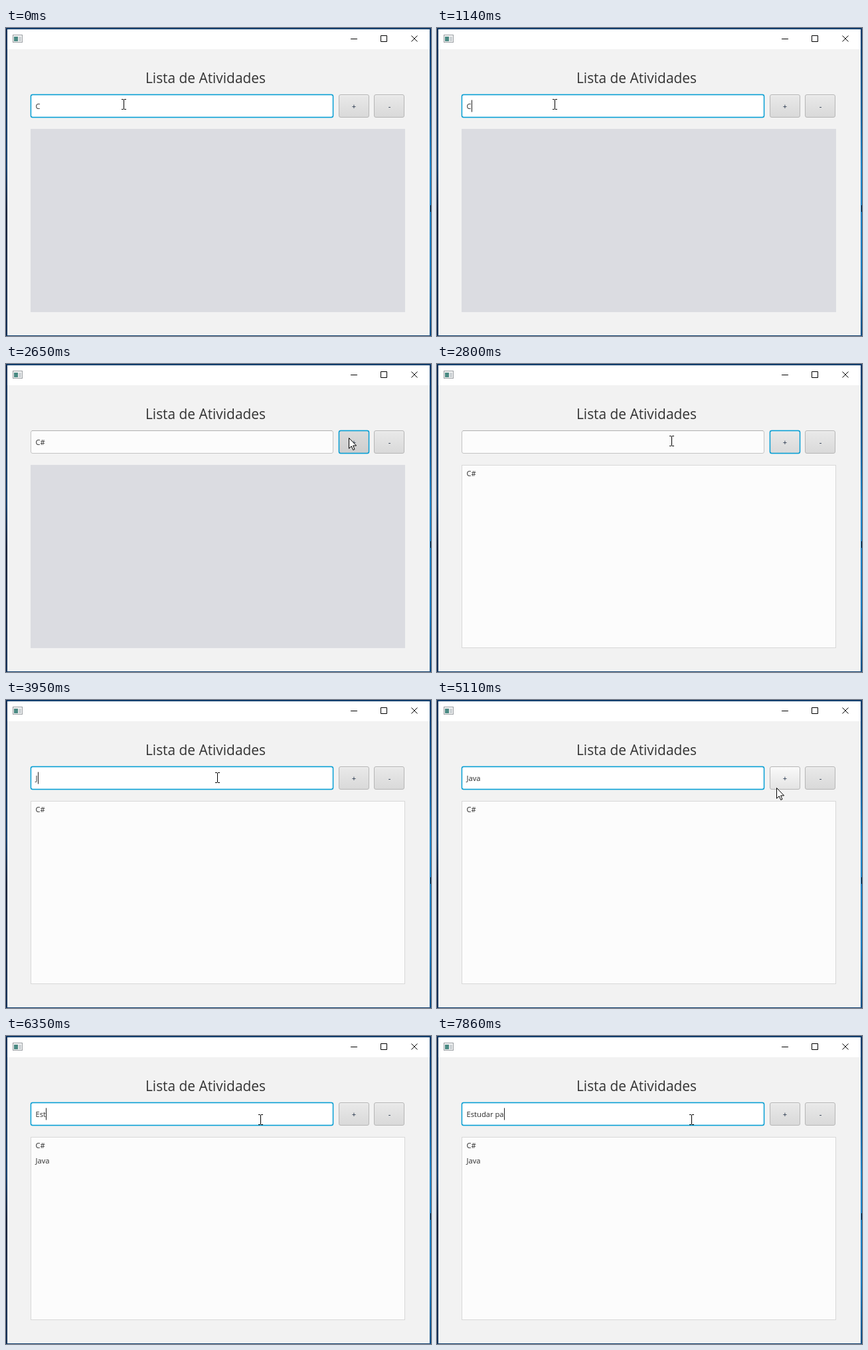
These frames come from a looping animation (640 by 464 pixels, 8000 ms). An HTML page:

```html
<!DOCTYPE html>
<html lang="pt">
<head>
<meta charset="utf-8">
<title>Lista de Atividades</title>
<style>
  html, body { margin: 0; width: 100%; height: 100%; overflow: hidden; background: #f2f2f2; }
  svg { display: block; width: 640px; height: 464px; }
  text { font: 11.2px "Open Sans", "Noto Sans", sans-serif; fill: #2b2b2b; white-space: pre; }
  .title { font-size: 20.9px; fill: #333; }
  .btn text { text-anchor: middle; fill: #16263f; }
  .box { fill: url(#normal); stroke: #b6b6b6; }
  .hover .box { fill: url(#hover); }
  .pressed .box { fill: url(#pressed); }
  .field .box { fill: #fcfcfc; stroke: #c4c4c4; }
  .shade { fill: none; stroke: #b0b0b0; }
  .ring, .glow { fill: none; visibility: hidden; }
  .ring { stroke: #089fd4; stroke-width: 1.4; }
  .glow { stroke: #039ed3; stroke-opacity: .14; stroke-width: 3; }
  .focus .ring, .focus .glow { visibility: visible; }
  .field.focus .box { fill: #fff; }
  .focus .shade { visibility: hidden; }
</style>
</head>
<body>
<svg viewBox="0 0 640 464">
  <defs>
    <linearGradient id="normal" x2="0" y2="1">
      <stop offset="0" stop-color="#f0f0f0"/><stop offset=".08" stop-color="#e8e8e8"/><stop offset="1" stop-color="#d9d9d9"/>
    </linearGradient>
    <linearGradient id="hover" x2="0" y2="1">
      <stop offset="0" stop-color="#fafafa"/><stop offset="1" stop-color="#e3e3e3"/>
    </linearGradient>
    <linearGradient id="pressed" x2="0" y2="1">
      <stop offset="0" stop-color="#dcdcdc"/><stop offset="1" stop-color="#cdcdcd"/>
    </linearGradient>
    <linearGradient id="rightEdge" x2="0" y2="1">
      <stop offset="0" stop-color="#0d3a6b"/><stop offset=".3" stop-color="#1464a4"/>
      <stop offset=".45" stop-color="#1c86cc"/><stop offset=".8" stop-color="#1a7cc2"/><stop offset="1" stop-color="#124f86"/>
    </linearGradient>
    <linearGradient id="leftEdge" x2="0" y2="1">
      <stop offset="0" stop-color="#0d2f57"/><stop offset=".45" stop-color="#123f70"/>
      <stop offset=".6" stop-color="#0a1e38"/><stop offset="1" stop-color="#0e3058"/>
    </linearGradient>
  </defs>

  <g id="window">
    <rect width="640" height="464" fill="#12406f"/>
    <rect width="2" height="464" fill="url(#leftEdge)"/>
    <rect x="638" width="2" height="464" fill="url(#rightEdge)"/>
    <rect x="639" y="267" width="1" height="10" fill="#0a1420"/>
    <rect x="2" y="2" width="636" height="30" fill="#fff"/>
    <rect x="2" y="32" width="636" height="431" fill="#f2f2f2"/>
    <rect x="10.5" y="10.5" width="14" height="11" fill="#f4f4f4" stroke="#9a9fa3"/>
    <rect x="12" y="13" width="6" height="7" fill="#4b8a83"/>
    <rect x="19" y="13" width="4" height="7" fill="#cdd2d5"/>
    <path d="M519 16.5h10M564.5 11.5h9v9h-9zM610.5 11.5l9 9m0 -9l-9 9" fill="none" stroke="#000"/>
    <text class="title" x="210" y="83">Lista de Atividades</text>
  </g>

  <g id="field" class="field">
    <rect class="glow" x="37.5" y="100.5" width="455" height="34" rx="3"/>
    <rect class="box" x="37.5" y="100.5" width="455" height="34" rx="2.5"/>
    <path class="shade" d="M39 100.5H491"/>
    <rect class="ring" x="37.5" y="100.5" width="455" height="34" rx="2.5"/>
    <text id="entry" x="44.5" y="122"></text>
    <rect id="caret" y="108.5" width="1" height="18" fill="#222"/>
  </g>

  <g id="add" class="btn">
    <rect class="glow" x="501.5" y="100.5" width="45" height="34" rx="3"/>
    <rect class="box" x="501.5" y="100.5" width="45" height="34" rx="2.5"/>
    <rect class="ring" x="501.5" y="100.5" width="45" height="34" rx="2.5"/>
    <text x="524" y="122">+</text>
  </g>
  <g class="btn">
    <rect class="box" x="554.5" y="100.5" width="45" height="34" rx="2.5"/>
    <text x="577.5" y="122">-</text>
  </g>

  <rect id="empty" x="37" y="152" width="564" height="276" fill="#dbdce1"/>
  <g id="list">
    <rect x="37.5" y="152.5" width="563" height="275" fill="#fcfcfc" stroke="#d8d8d8"/>
    <text x="44.5" y="168.5">C#</text>
    <text id="second" x="44.5" y="192">Java</text>
  </g>

  <path id="arrow" d="M.5 .5V16.3L4.2 12.8L6.7 18.5L9 17.5L6.6 12H11.6Z" fill="#fff" stroke="#000"/>
  <path id="beam" d="M-3 .5H0M1 .5H4M.5 1V15M-3 15.5H0M1 15.5H4" fill="none" stroke="#000"/>
</svg>
<script>
  const LOOP = 8000;
  const el = id => document.getElementById(id);
  const beam = (x, y) => ({ pointer: 'beam', x, y });
  const arrow = (x, y) => ({ pointer: 'arrow', x, y });
  const type = text => ({ text, caret: true });

  // Each step changes only the listed parts of the state.
  const steps = [
    [0, { text: 'C', caret: false, focus: 'field', button: '', items: 0, ...beam(177, 107) }],
    [150, { caret: true }],
    [580, { caret: false }],
    [1140, { caret: true }],
    [1570, type('C#')],
    [1820, arrow(372, 147)],
    [1970, arrow(462, 134)],
    [2100, { ...arrow(509, 116), button: 'hover', caret: false }],
    [2240, arrow(516, 111)],
    [2520, { focus: 'add', button: 'pressed' }],
    [2800, { text: '', items: 1, button: '', ...beam(353, 108) }],
    [2950, beam(326, 109)],
    [3090, beam(318, 109)],
    [3230, { focus: 'field', caret: true }],
    [3670, { caret: false }],
    [3950, type('J')],
    [4100, type('Ja')],
    [4380, type('Jav')],
    [4680, type('Java')],
    [4820, beam(372, 113)],
    [4960, beam(456, 117)],
    [5110, { ...arrow(511, 132), caret: false, button: 'hover' }],
    [5260, arrow(517, 116)],
    [5390, { focus: 'add', button: 'pressed' }],
    [5530, { text: '', items: 2, button: 'hover' }],
    [5810, { focus: 'field', caret: true, button: '', ...beam(383, 118) }],
    [5960, type('E')],
    [6230, type('Es')],
    [6350, type('Est')],
    [6630, type('Estu')],
    [6910, type('Estud')],
    [7050, type('Estuda')],
    [7190, type('Estudar')],
    [7440, type('Estudar ')],
    [7580, type('Estudar p')],
    [7860, type('Estudar pa')]
  ];

  const show = (id, on) => el(id).setAttribute('visibility', on ? 'visible' : 'hidden');

  function draw(s) {
    const entry = el('entry');
    entry.textContent = s.text;
    const width = s.text ? entry.getComputedTextLength() : 0;
    el('caret').setAttribute('x', Math.floor(45 + width));
    show('caret', s.caret);
    el('field').setAttribute('class', s.focus === 'field' ? 'field focus' : 'field');
    el('add').setAttribute('class', `btn ${s.button} ${s.focus === 'add' ? 'focus' : ''}`);
    show('empty', s.items === 0);
    show('list', s.items > 0);
    show('second', s.items > 1);
    for (const id of ['arrow', 'beam']) show(id, s.pointer === id);
    el(s.pointer).setAttribute('transform', `translate(${s.x} ${s.y})`);
  }

  const start = performance.now();
  function tick() {
    const t = Math.max(0, performance.now() - start) % LOOP;
    draw(Object.assign({}, ...steps.filter(([at]) => at <= t).map(([, change]) => change)));
    requestAnimationFrame(tick);
  }
  tick();
</script>
</body>
</html>
```
